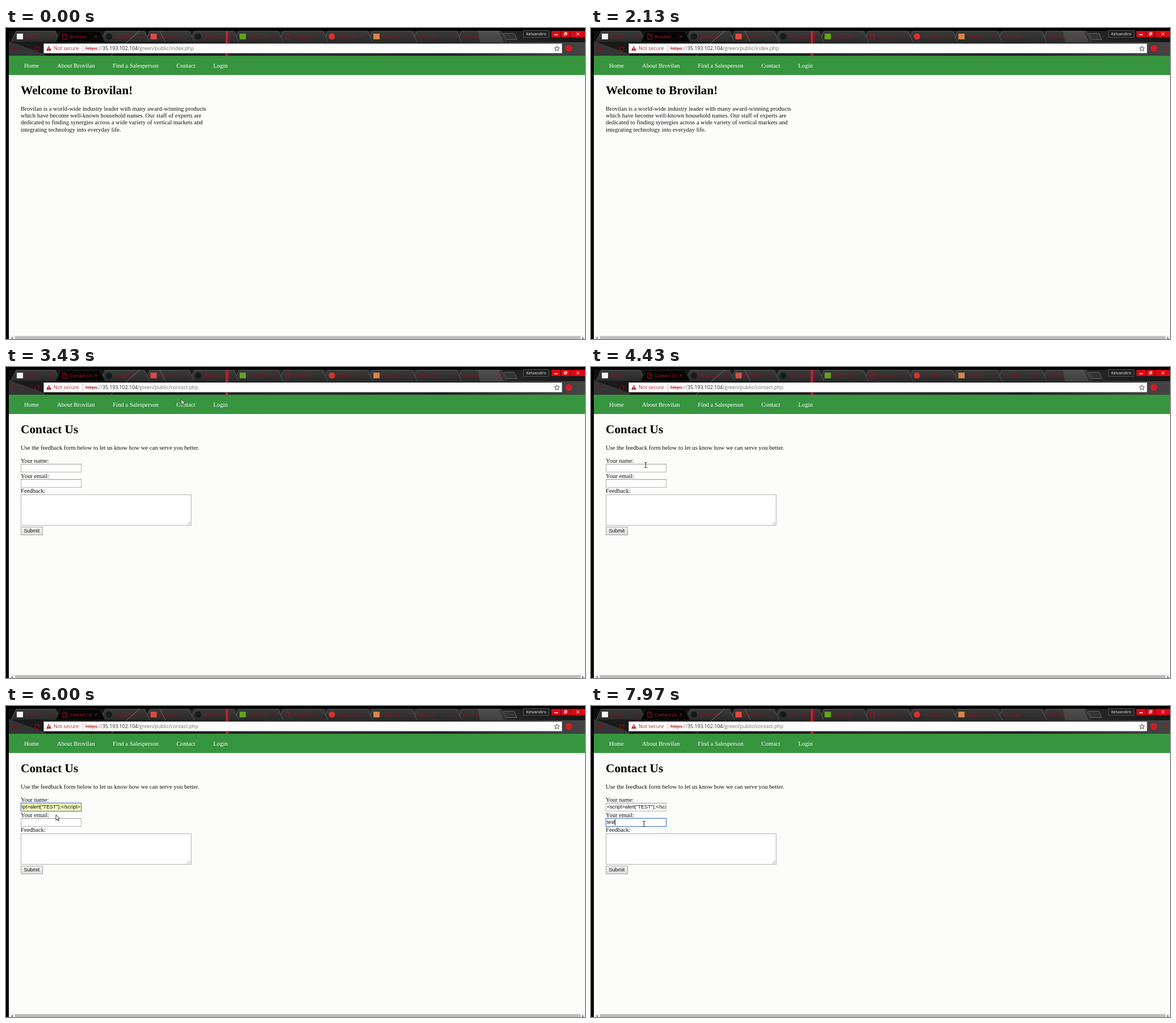
These frames come from a looping animation (1021x549 px, 8000 ms). An HTML page with a canvas:

```html
<!DOCTYPE html>
<html lang="en">
<head>
<meta charset="utf-8">
<title>Contact form</title>
<style>
html, body { margin: 0; width: 100%; height: 100%; overflow: hidden; background: #000; }
canvas { display: block; }
</style>
</head>
<body>
<canvas id="stage" width="1021" height="549"></canvas>
<script>
const W = 1021, H = 549, LOOP = 8000;
const ctx = document.getElementById('stage').getContext('2d');

const SERIF = '"Liberation Serif", "Times New Roman", serif';
const SANS = '"Liberation Sans", Arial, sans-serif';
const UI = '"Open Sans", "Noto Sans", sans-serif';
const BRAND = 'Brovilan';
const PAYLOAD = '<script>alert("TEST");<\/script>';

const NAME_BOX = [26, 171, 107, 15];
const EMAIL_BOX = [26, 198, 107, 15];

// Event times in ms
const CURSOR_IN = 2700, PAGE_CHANGE = 3230, NAME_FOCUS = 4900,
      NAME_FILL = 5700, EMAIL_FOCUS = 6750, TYPE_START = 7250, TYPE_STEP = 180;

// Pointer stops: time, x, y
const PATH = [
  [2700, 336, 108], [3000, 314, 65], [3230, 313, 64], [3420, 309, 57],
  [3560, 309, 57], [4330, 96, 173], [5200, 96, 173], [5560, 88, 192],
  [6040, 88, 192], [6600, 93, 208], [8000, 93, 208]
];

const TABS = [
  ['Cursos', 'square', '#f4f4f4'],
  [BRAND, 'page'],
  ['assign/wk', 'circle', '#15191d'],
  ['Email Inb', 'square', '#dd4a40'],
  ['Web Secu', 'circle', '#15191d'],
  ['Stack Lab', 'square', '#62a51c'],
  ['Wiki post', 'page'],
  ['Lab Exam', 'circle', '#d8322a'],
  ['Page Lab', 'square', '#d98544'],
  ['New Tab'],
  ['New Tab']
];
const TAB_STEP = 78.6;

function rect(x, y, w, h, color) {
  ctx.fillStyle = color;
  ctx.fillRect(x, y, w, h);
}

function frame(x, y, w, h, color) {
  ctx.strokeStyle = color;
  ctx.lineWidth = 1;
  ctx.strokeRect(x + .5, y + .5, w - 1, h - 1);
}

function text(str, x, y, font, color, align = 'left') {
  ctx.font = font;
  ctx.fillStyle = color;
  ctx.textAlign = align;
  ctx.fillText(str, x, y);
  return ctx.measureText(str).width;
}

function line(points, color, width = 1) {
  ctx.beginPath();
  points.forEach(([x, y]) => ctx.lineTo(x, y));
  ctx.strokeStyle = color;
  ctx.lineWidth = width;
  ctx.stroke();
}

function poly(points, fill, stroke) {
  ctx.beginPath();
  points.forEach(([x, y]) => ctx.lineTo(x, y));
  ctx.closePath();
  if (fill) { ctx.fillStyle = fill; ctx.fill(); }
  if (stroke) { ctx.strokeStyle = stroke; ctx.lineWidth = 1; ctx.stroke(); }
}

function circle(x, y, r, color) {
  ctx.beginPath();
  ctx.arc(x, y, r, 0, 7);
  ctx.fillStyle = color;
  ctx.fill();
}

function cross(x, y, r, color) {
  line([[x - r, y - r], [x + r, y + r]], color);
  line([[x - r, y + r], [x + r, y - r]], color);
}

function gradient(x0, y0, x1, y1, colors) {
  const g = ctx.createLinearGradient(x0, y0, x1, y1);
  colors.forEach((c, i) => g.addColorStop(i / (colors.length - 1), c));
  return g;
}

function drawIcon(kind, x, color) {
  if (kind === 'square') rect(x, 10, 11, 10, color);
  if (kind === 'circle') circle(x + 5.5, 15, 5.5, color);
  if (kind === 'page') {
    poly([[x + 2.5, 10.5], [x + 6.5, 10.5], [x + 9.5, 13.5], [x + 9.5, 20], [x + 2.5, 20]], null, '#b80b18');
    line([[x + 6.5, 10.5], [x + 6.5, 13.5], [x + 9.5, 13.5]], '#b80b18');
  }
}

function drawTab(i, title) {
  const x = 9 + TAB_STEP * i, active = i === 1;
  const shape = [[x, 24.5], [x + 9, 5.5], [x + 78, 5.5], [x + 87, 24.5]];
  const fill = active ? '#060606' : gradient(0, 5, 0, 25, ['#3b3b3b', '#292929']);
  poly(shape, fill);
  line(shape, active ? '#343434' : '#626262', .8);
  const [, kind, color] = TABS[i];
  drawIcon(kind, x + 10, color);
  text(title, x + (kind ? 25 : 10), 17.6, '7.7px ' + UI, active ? '#d20c1b' : '#a40a18');
  cross(x + 71, 15, 2.2, active ? '#c00a18' : '#8a0c16');
}

function drawWindowButtons() {
  rect(912, 5, 46, 11, '#202020');
  frame(912, 4, 46, 13, '#555');
  text('Kelvandiro', 935, 13.3, '7.2px ' + UI, '#f2f2f2', 'center');
  rect(962, 5, 16, 11, '#df0713');
  rect(979, 5, 15, 11, '#df0713');
  rect(995, 5, 26, 11, '#df0713');
  rect(967, 11, 6, 1.5, '#fff');
  frame(984, 9, 4, 4, '#fff');
  line([[985, 8], [989, 8], [989, 12]], '#fff');
  cross(1008.5, 10.5, 2.5, '#fff');
}

function drawAddress(file) {
  rect(66, 27, 915, 18, '#fdfdfd');
  frame(66, 27, 915, 18, '#8c8c8c');
  poly([[75.5, 31.5], [80, 40], [71, 40]], '#b12731');
  rect(75, 34, 1, 3, '#fff');
  rect(75, 38, 1, 1, '#fff');
  const font = '8.8px ' + UI, red = '#b52c36', y = 39.4;
  text('Not secure', 84, y, font, red);
  rect(135, 31, 1, 11, '#dfb2b5');
  let x = 140;
  const scheme = text('https', x, y, font, red);
  rect(x, 36, scheme, 1, red);
  x += scheme;
  x += text('://', x, y, font, '#777');
  x += text('35.193.102.104', x, y, font, '#252525');
  text('/green/public/' + file, x, y, font, '#717171');
  const star = [];
  for (let i = 0; i < 10; i++) {
    const a = -Math.PI / 2 + i * Math.PI / 5, r = i % 2 ? 2.1 : 4.8;
    star.push([971.5 + r * Math.cos(a), 36.5 + r * Math.sin(a)]);
  }
  poly(star, null, '#4a4a4a');
}

function drawBrowser(title, file) {
  rect(0, 0, W, 49, '#000');
  rect(5, 5, W - 5, 20, gradient(5, 0, W, 0, ['#101010', '#1a1a1a', '#2c2c2c', '#333', '#161616']));
  rect(5, 25, W - 5, 24, gradient(5, 0, W, 0, ['#1a1a1a', '#161616', '#2a2a2a', '#202020', '#454545']));
  poly([[5, 23], [68, 46], [68, 49], [5, 49]], '#343434');
  for (let i = TABS.length - 1; i >= 0; i--) if (i !== 1) drawTab(i, TABS[i][0]);
  drawTab(1, title);
  poly([[877, 9.5], [896, 9.5], [901, 20.5], [883, 20.5]], '#333', '#666');
  line([[185, 49], [236, 5]], 'rgba(190,190,190,.45)');
  line([[271, 5], [281, 25]], 'rgba(190,190,190,.4)');
  rect(386, 5, 9, 44, 'rgba(190,12,35,.35)');
  rect(388, 5, 3, 44, 'rgba(225,50,70,.65)');
  poly([[832, 5], [869, 5], [878, 25], [836, 25]], 'rgba(150,150,150,.22)');
  drawWindowButtons();

  line([[21, 36], [13, 36]], '#8c0914', 1.3);
  line([[17, 32], [13, 36], [17, 40]], '#8c0914', 1.3);
  ctx.beginPath();
  ctx.arc(54.5, 36.5, 3.8, .4, 5.5);
  ctx.strokeStyle = '#8c0914';
  ctx.lineWidth = 1.3;
  ctx.stroke();
  poly([[59, 32], [59, 36], [55, 36]], '#8c0914');
  drawAddress(file);
  circle(992.5, 36, 6, '#d51c25');
  for (let i = -1; i < 2; i++) rect(1014, 35.5 + i * 3.5, 1.5, 1.5, '#a50b18');
}

function drawPageBase() {
  rect(0, 49, 5, H - 49, '#000');
  rect(5, 49, W - 5, H - 49, '#fcfcfb');
  rect(5, 49, W - 5, 34, '#37953f');
  const links = [['Home', 32], ['About ' + BRAND, 90], ['Find a Salesperson', 188.3],
                 ['Contact', 300.5], ['Login', 365.6]];
  links.forEach(([s, x]) => body(s, x, 70, '#fff'));
  rect(5, 543, W - 5, 6, '#f0f0ef');
  rect(16, 544, 997, 5, '#bdbdba');
  poly([[9, 547.5], [12, 545], [12, 550]], '#777');
  poly([[1019, 547.5], [1016, 545], [1016, 550]], '#777');
}

function body(str, x, y, color = '#111') {
  text(str, x, y, '10.667px ' + SERIF, color);
}

function heading(str) {
  text(str, 26, 116.5, 'bold 21.333px ' + SERIF, '#000');
}

function drawHome() {
  heading('Welcome to ' + BRAND + '!');
  [BRAND + ' is a world-wide industry leader with many award-winning products',
   'which have become well-known household names. Our staff of experts are',
   'dedicated to finding synergies across a wide variety of vertical markets and',
   'integrating technology into everyday life.'
  ].forEach((s, i) => body(s, 26, 145.7 + i * 12.27));
}

function drawField([x, y, w, h], value, { focus, fill = '#fefefe', atEnd, caret }) {
  rect(x, y, w, h, fill);
  frame(x, y, w, h, focus ? '#5c86cf' : '#b4b4b4');
  if (focus) {
    ctx.globalAlpha = .45;
    frame(x - 1, y - 1, w + 2, h + 2, '#7ea3e0');
    ctx.globalAlpha = 1;
  } else {
    rect(x, y, w, 1, '#969696');
  }
  ctx.save();
  ctx.beginPath();
  ctx.rect(x + 1.5, y + 1, w - 3, h - 2);
  ctx.clip();
  const tx = atEnd ? x + w - 2 : x + 2;
  const width = text(value, tx, y + 10.2, '8.889px ' + SANS, '#111', atEnd ? 'right' : 'left');
  if (caret) rect(Math.round(tx + width), y + 2, 1, 11, '#222');
  ctx.restore();
}

function drawContact(t) {
  heading('Contact Us');
  body('Use the feedback form below to let us know how we can serve you better.', 26, 145.7);
  body('Your name:', 26, 168.7);
  body('Your email:', 26, 195.6);
  body('Feedback:', 26, 222.4);

  const emailOn = t >= EMAIL_FOCUS;
  const nameOn = t >= NAME_FOCUS && !emailOn;
  const filled = t >= NAME_FILL;
  drawField(NAME_BOX, filled ? PAYLOAD : '', {
    focus: nameOn, atEnd: filled && nameOn, caret: nameOn && !filled,
    fill: filled && nameOn ? '#f8fab8' : '#fefefe'
  });
  const typed = Math.max(0, Math.floor((t - TYPE_START) / TYPE_STEP) + 1);
  drawField(EMAIL_BOX, 'test'.slice(0, typed), { focus: emailOn, caret: emailOn });

  rect(26, 225, 301, 55, '#fefefe');
  frame(26, 225, 301, 55, '#b0b0b0');
  line([[320, 278], [325, 273]], '#888', .8);
  line([[323, 278], [325, 276]], '#888', .8);

  rect(26, 282, 39, 15, gradient(0, 282, 0, 297, ['#f6f6f6', '#dcdcdc']));
  frame(26, 282, 39, 15, '#a8a8a8');
  text('Submit', 45.3, 292.3, '8.889px ' + SANS, '#111', 'center');
}

function pointerAt(t) {
  const i = Math.max(1, PATH.findIndex(p => p[0] > t));
  const [t0, x0, y0] = PATH[i - 1], [t1, x1, y1] = PATH[i];
  const u = (t - t0) / (t1 - t0), e = u * u * (3 - 2 * u);
  return [x0 + (x1 - x0) * e, y0 + (y1 - y0) * e];
}

function inside([x, y, w, h], px, py) {
  return px >= x && px <= x + w && py >= y && py <= y + h;
}

function drawPointer(t) {
  if (t < CURSOR_IN) return;
  const [x, y] = pointerAt(t).map(Math.round);
  if (t >= PAGE_CHANGE && (inside(NAME_BOX, x, y) || inside(EMAIL_BOX, x, y))) {
    rect(x, y - 4, 1, 9, '#333');
    rect(x - 2, y - 5, 5, 1, '#444');
    rect(x - 2, y + 4, 5, 1, '#444');
    return;
  }
  const shape = [[0, 0], [0, 9.5], [2.2, 7.6], [3.8, 11], [5.2, 10.3], [3.8, 7], [6.6, 6.8]];
  poly(shape.map(([dx, dy]) => [x + dx, y + dy]), '#fff', '#333');
}

function draw(t) {
  const contact = t >= PAGE_CHANGE;
  drawPageBase();
  if (contact) drawContact(t); else drawHome();
  drawBrowser(contact ? 'Contact Us' : BRAND, contact ? 'contact.php' : 'index.php');
  drawPointer(t);
}

const start = performance.now();
function tick() {
  draw((performance.now() - start) % LOOP);
  requestAnimationFrame(tick);
}
tick();
</script>
</body>
</html>
```
